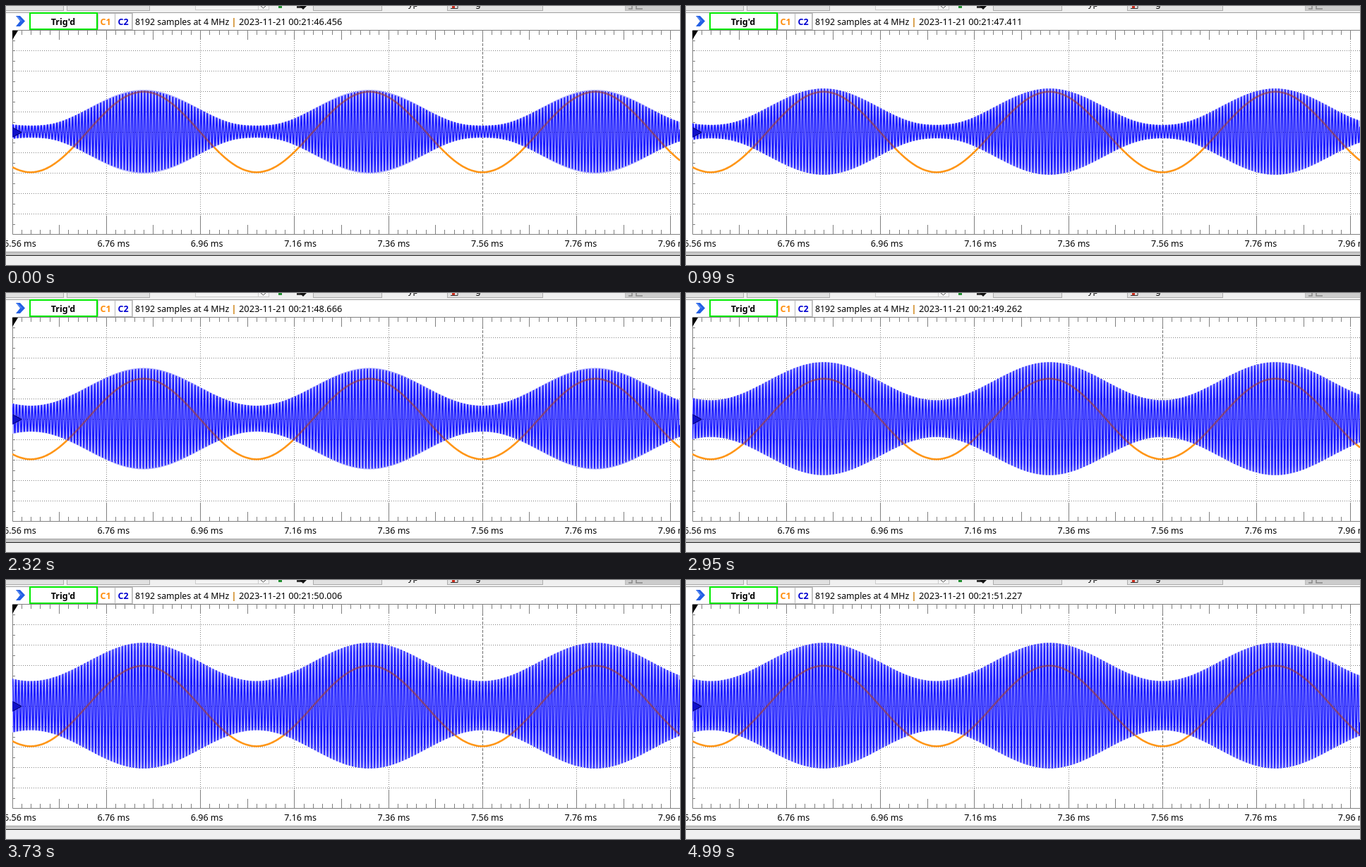
An HTML page with a canvas that plays this animation: 955 px wide and 368 px high, repeating every 5.06 s.

```html
<!DOCTYPE html>
<html lang="en">
<head>
<meta charset="utf-8">
<title>Oscilloscope</title>
<style>
html, body { margin: 0; width: 100%; height: 100%; overflow: hidden; background: #fff; }
canvas { display: block; }
</style>
</head>
<body>
<canvas id="scope" width="955" height="368"></canvas>
<script>
const ctx = document.getElementById('scope').getContext('2d');
const W = 955, H = 368, LOOP = 5060, STEPS = 72;
const LEFT = 9, TOP = 35, BOTTOM = 324, MID = 179;
const DIV_X = 133.25, DIV_Y = 29;
const MOD_PERIOD = 320, MOD_PEAK = 195, CARRIER = 4.44;
const FONT = '"Noto Sans", "Open Sans", sans-serif';

// [loop time, carrier level] and [loop time, clock ms after 00:21:46]
const LEVEL = [[0, 31], [570, 31.2], [990, 33], [1620, 36.5], [2320, 44.2],
  [2950, 52.4], [3400, 59.8], [3520, 61.5], [5060, 61.5]];
const CLOCK = [[0, 456], [990, 1411], [1620, 1995], [2320, 2666],
  [2950, 3262], [3730, 4006], [4990, 5227]];

function interpolate(points, t) {
  let i = 1;
  while (i < points.length - 1 && t > points[i][0]) i++;
  const [t0, v0] = points[i - 1], [t1, v1] = points[i];
  return v0 + (v1 - v0) * (t - t0) / (t1 - t0);
}

const stepStart = n => n * 70 + (n > 4 ? 10 : 0) + (n > 44 ? 10 : 0);
const random = n => {
  const v = Math.sin(n * 91.7 + 3.1) * 43758.5453;
  return v - Math.floor(v);
};
const modulation = x => Math.cos((x - MOD_PEAK) / MOD_PERIOD * 2 * Math.PI);

function rect(x, y, w, h, fill, stroke, lineWidth = 1) {
  if (fill) { ctx.fillStyle = fill; ctx.fillRect(x, y, w, h); }
  if (stroke) {
    ctx.strokeStyle = stroke;
    ctx.lineWidth = lineWidth;
    const o = lineWidth / 2;
    ctx.strokeRect(x + o, y + o, w - lineWidth, h - lineWidth);
  }
}

function line(points, color, width = 1, dash = []) {
  ctx.beginPath();
  points.forEach(([x, y]) => ctx.lineTo(x, y));
  ctx.strokeStyle = color;
  ctx.lineWidth = width;
  ctx.setLineDash(dash);
  ctx.stroke();
  ctx.setLineDash([]);
}

function polygon(points, color) {
  ctx.beginPath();
  points.forEach(([x, y]) => ctx.lineTo(x, y));
  ctx.fillStyle = color;
  ctx.fill();
}

function text(str, x, y, size, color = '#000', align = 'left', weight = '') {
  ctx.font = `${weight} ${size}px ${FONT}`;
  ctx.textAlign = align;
  ctx.fillStyle = color;
  ctx.fillText(str, x, y);
}

function drawToolbar() {
  rect(0, 0, W, 9, '#f0f0f0');
  rect(0, 9, W, 1, '#a0a0a0');
  [[-5, 87], [86, 118], [435, 98], [625, 136]].forEach(([x, w]) =>
    rect(x, -5, w, 12, '#e1e1e1', '#adadad'));
  rect(268, -5, 105, 11, '#f4f4f4', '#cccccc');
  rect(357, -5, 16, 11, '#f4f4f4', '#cccccc');
  line([[361, 0], [364.5, 3], [368, 0]], '#555', 1);
  rect(386, 0, 5, 3, '#219030');
  rect(412, 0, 10, 3, '#333');
  polygon([[416, 0], [426, 0], [421, 5]], '#111');
  text('yp', 570, 1, 12.5);
  line([[630, 3.5], [640, 3.5], [640, 0]], '#333');
  rect(632, 0, 4, 3, '#d03020');
  text('g', 665, 1, 12.5);
  rect(877, -5, 90, 12, '#cccccc', '#bdbdbd');
  line([[882, 4], [887, 4], [887, 0]], '#888', 1.5);
  line([[893, 0], [893, 4], [902, 4]], '#888', 1.5);
}

function drawHeader(t) {
  polygon([[14, 14], [20, 14], [27, 21.5], [20, 29], [14, 29], [20, 21.5]], '#2460e4');
  line([[16, 15], [22, 21.5]], '#7caaff');
  rect(130, 10, 25, 24, '#fff', '#b8b8b8');
  rect(154, 10, 25, 24, '#fff', '#b8b8b8');
  rect(33, 9, 97, 25, '#fff', '#00ec00', 2);
  text("Trig'd", 81, 27, 12.5, '#000', 'center', 'bold');
  text('C1', 141, 27, 12.5, '#ff8c0a', 'center', 'bold');
  text('C2', 166, 27, 12.5, '#0000d0', 'center', 'bold');
  rect(179, 10, 1, 24, '#c8c8c8');
  text('8192 samples at 4 MHz', 183, 27, 12.3);
  text('|', 323, 27, 12.5, '#c87800', 'center', 'bold');
  const ms = 46000 + Math.round(interpolate(CLOCK, t));
  text('2023-11-21 00:21:' + (ms / 1000).toFixed(3), 330, 27, 12.8);
}

function drawGrid() {
  for (let row = -4; row <= 4; row++) {
    const y = MID + 0.5 + row * DIV_Y;
    line([[LEFT, y], [W, y]], '#808080', 1, [1, 2]);
  }
  for (let i = 0; i < 8; i++) {
    const x = Math.floor(LEFT + i * DIV_X) + 0.5;
    if (i) line([[x, TOP], [x, BOTTOM]], i === 5 ? '#707070' : '#808080', 1, i === 5 ? [4, 2] : [1, 2]);
  }
  for (let k = 1; k < 72; k++) {
    const x = Math.floor(LEFT + k * DIV_X / 10) + 0.5;
    const len = k % 10 === 0 ? 26 : k % 5 === 0 ? 13 : 6;
    line([[x, TOP], [x, TOP + Math.min(len, 13)]], '#808080');
    line([[x, BOTTOM - len], [x, BOTTOM]], '#808080');
  }
  for (let k = -9; k <= 9; k++) {
    const y = Math.round(MID + k * DIV_Y / 2) + 0.5;
    line([[LEFT, y], [LEFT + 4, y]], '#808080');
  }
  line([[W, 34.5], [9.5, 34.5], [9.5, 324.5], [W, 324.5]], '#808080');
}

function drawSignals(t, step) {
  const level = interpolate(LEVEL, t);
  const depth = 28 - 0.5 * Math.min(1, (level - 31) / 6);
  const envelope = x => Math.hypot(level + depth * modulation(x), 8);
  const phase = random(step) * 2 * Math.PI;
  const upper = [], lower = [], tone = [], carrier = [];
  for (let x = LEFT; x <= W; x++) {
    upper.push([x, MID - 0.5 - envelope(x)]);
    lower.unshift([x, MID - 0.5 + envelope(x)]);
    tone.push([x, MID - 57.2 * modulation(x)]);
  }
  for (let x = LEFT; x <= W; x += 0.37) {
    const wave = Math.sin(x / CARRIER * 2 * Math.PI + phase);
    carrier.push([x, MID - 0.5 + envelope(x) * wave]);
  }

  ctx.save();
  ctx.beginPath();
  ctx.rect(LEFT, TOP, W - LEFT, BOTTOM - TOP);
  ctx.clip();
  line(tone, '#ff9618', 2.6);
  polygon(upper.concat(lower), '#b9b9ff');
  ctx.lineJoin = 'bevel';
  line(carrier, '#1414ff', 1.5);

  // Grid and first channel show through the modulated band.
  ctx.beginPath();
  upper.concat(lower).forEach(([x, y]) => ctx.lineTo(x, y));
  ctx.clip();
  ctx.globalAlpha = 0.62;
  line(tone, '#a03c32', 2.6);
  ctx.globalAlpha = 0.5;
  for (let row = -3; row <= 3; row++) {
    const y = MID + 0.5 + row * DIV_Y;
    line([[LEFT, y], [W, y]], '#0a0a90', 1, [1, 2]);
  }
  ctx.restore();
}

function drawMarkers() {
  polygon([[9, 35], [17, 35], [9, 48]], '#000');
  polygon([[9, 172], [23, 179.5], [9, 187]], '#1010c8');
  line([[10, 173], [22, 179.5], [10, 186]], '#000070');
}

function drawFooter() {
  for (let i = 0; i < 8; i++) {
    text((6.56 + i * 0.2).toFixed(2) + ' ms', -3 + i * 132.4, 342, 12.5);
  }
  rect(0, 349, W, 5, '#c8c8c8');
  rect(0, 349, W, 1, '#a0a0a0');
  rect(0, 354, W, 1, '#202020');
  rect(0, 355, W, H - 355, '#f0f0f0');
}

function draw(step) {
  const t = stepStart(step);
  rect(0, 0, W, H, '#fff');
  drawToolbar();
  drawHeader(t);
  drawGrid();
  drawSignals(t, step);
  drawMarkers();
  drawFooter();
}

let shown = -1;
const began = performance.now();
function tick() {
  const t = (performance.now() - began) % LOOP;
  let step = STEPS - 1;
  while (step > 0 && stepStart(step) > t) step--;
  if (step !== shown) draw(shown = step);
  requestAnimationFrame(tick);
}
tick();
</script>
</body>
</html>
```
